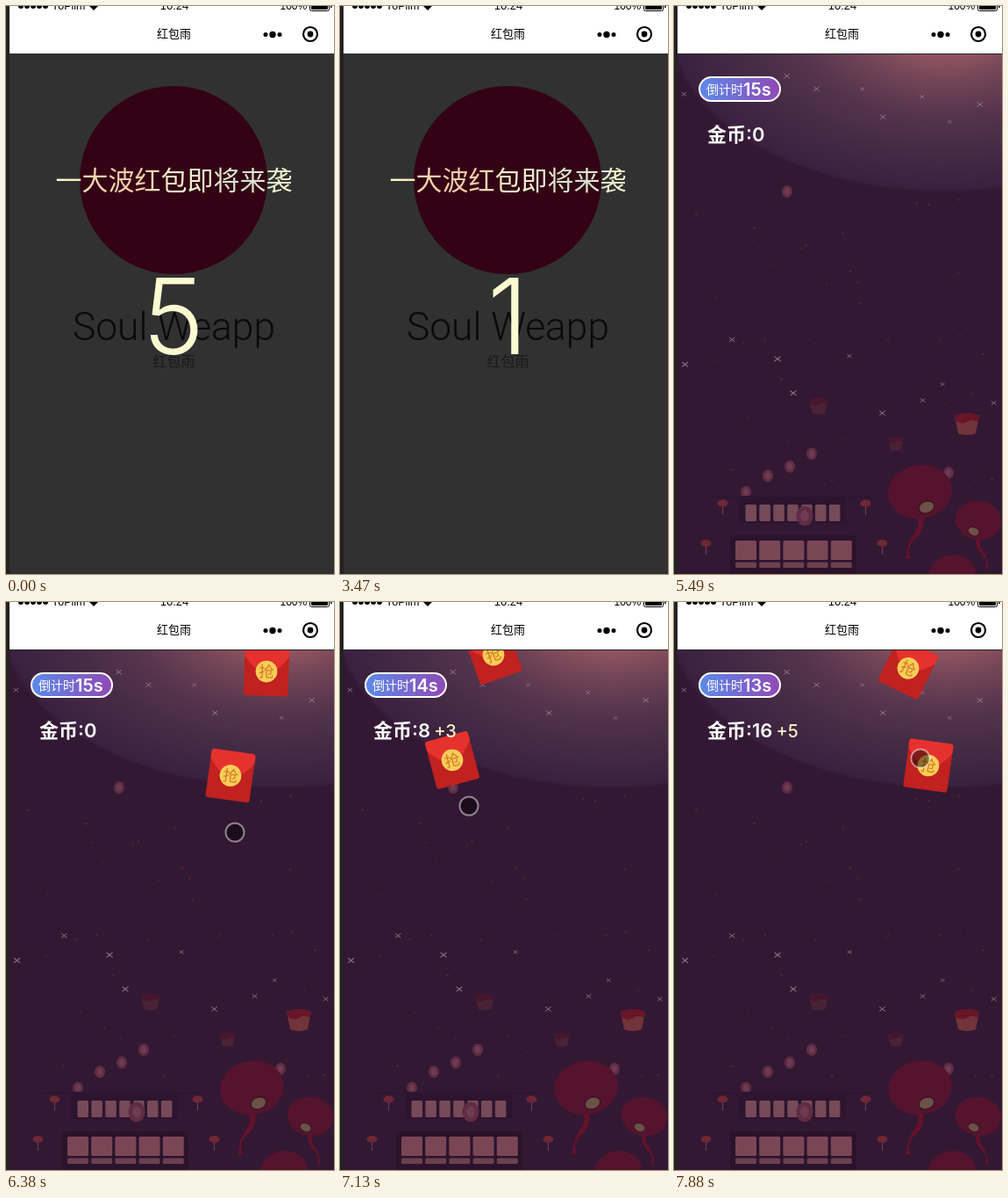
Animation, 374 px wide and 646 px high, one loop 8 s. Source, as an HTML page:

```html
<!DOCTYPE html>
<html lang="zh-CN">
<head>
<meta charset="utf-8">
<title>红包雨</title>
<style>
html, body { margin: 0; width: 100%; height: 100%; overflow: hidden; background: #222; }
svg { display: block; width: 374px; height: 646px; }
text { font-family: Inter, "Noto Sans CJK SC", "Noto Sans CJK", sans-serif; }
.thin { font-family: Roboto, "Open Sans", sans-serif; font-weight: 300; }
.cjk { font-family: "Noto Sans CJK SC", "Noto Sans CJK", sans-serif; }
.mid { text-anchor: middle; }
.bar { font-family: "Liberation Sans", sans-serif; }
</style>
</head>
<body>
<svg viewBox="0 0 374 646" xmlns="http://www.w3.org/2000/svg">
  <defs>
    <clipPath id="page"><rect x="4" y="55" width="370" height="591"/></clipPath>
    <radialGradient id="glow" gradientUnits="userSpaceOnUse" cx="0" cy="0" r="192"
      gradientTransform="translate(310 20) scale(1.65 1)">
      <stop offset="0" stop-color="#a2616b"/>
      <stop offset=".2" stop-color="#8f5360"/>
      <stop offset=".34" stop-color="#734557"/>
      <stop offset=".55" stop-color="#55344d"/>
      <stop offset=".78" stop-color="#442a44"/>
      <stop offset=".98" stop-color="#3a2140"/>
      <stop offset="1" stop-color="#331833"/>
    </radialGradient>
    <linearGradient id="badge">
      <stop offset="0" stop-color="#5b8aec"/>
      <stop offset="1" stop-color="#9149b4"/>
    </linearGradient>
    <linearGradient id="cream" gradientUnits="userSpaceOnUse" x1="57" x2="327" y1="0" y2="0">
      <stop offset="0" stop-color="#fdf8cf"/>
      <stop offset=".2" stop-color="#f6ccab"/>
      <stop offset=".36" stop-color="#f6ccab"/>
      <stop offset=".5" stop-color="#f8f4ce"/>
      <stop offset=".8" stop-color="#cfe0d2"/>
      <stop offset="1" stop-color="#fdf8cf"/>
    </linearGradient>
    <path id="spark" d="M-3-2.4 3 2.4M3-2.4-3 2.4" stroke="#937e90" stroke-width=".9"/>
    <g id="pendant">
      <path d="M0 0v13" stroke="#66404d" stroke-width="1.2"/>
      <ellipse rx="6" ry="4" fill="#6f2735"/>
    </g>
    <g id="pail">
      <path d="M-14-8Q0-14 14-8L10 12Q0 16-10 12Z" fill="#70343a"/>
      <path d="M-14-8Q0-14 14-8L12.5-1Q6-5 0-1T-12.5-2Z" fill="#681528"/>
    </g>
    <g id="bokeh">
      <ellipse rx="6" ry="7" fill="#602c44"/>
      <ellipse rx="3" ry="4" fill="#fff" opacity=".08"/>
    </g>
    <g id="lantern">
      <path d="M3 26Q7 42-5 53T-10 75L-16 76Q-14 56-7 48T-3 28Z" fill="#63122a"/>
      <ellipse rx="36.5" ry="30.5" fill="#56132e" transform="rotate(-10)"/>
      <g transform="translate(7.5 17.5) rotate(-20)">
        <ellipse rx="10" ry="7.5" fill="#3b1420"/>
        <ellipse rx="8.5" ry="6" fill="#6b5147"/>
      </g>
    </g>
    <g id="packet">
      <rect x="-24.5" y="-27" width="49" height="54" rx="3" fill="#c1211f"/>
      <path d="M-24.5-17V-24Q-24.5-27-21.5-27H21.5Q24.5-27 24.5-24V-17Q0 20-24.5-17Z" fill="#e6322e"/>
      <circle r="12" fill="#f8cd58"/>
      <text class="cjk mid" y="6.4" font-size="17" fill="#d27a22">抢</text>
    </g>
  </defs>

  <rect width="374" height="646" fill="#222"/>

  <g id="intro">
    <rect x="4" y="54" width="370" height="592" fill="#313131"/>
    <circle cx="191" cy="198" r="107" fill="#330214"/>
    <text class="thin mid" x="191.5" y="380" font-size="44.3" fill="#0a0a0a">Soul Weapp</text>
    <text class="cjk mid" x="191.5" y="410" font-size="16" font-weight="300" fill="#1b1b1b">红包雨</text>
    <text class="cjk mid" x="191.5" y="209" font-size="30" font-weight="300" fill="url(#cream)">一大波红包即将来袭</text>
    <text class="mid" id="count" x="191.5" y="395.5" font-size="119" font-weight="300" fill="#fdfad2"></text>
  </g>

  <g id="game" clip-path="url(#page)">
    <rect x="4" y="55" width="370" height="591" fill="#331833"/>
    <rect x="4" y="55" width="370" height="591" fill="url(#glow)"/>
    <g id="scene"></g>
    <g id="packets"></g>
    <rect x="29" y="81" width="92" height="27" rx="13.5" fill="url(#badge)" stroke="#fff" stroke-width="2"/>
    <text class="cjk" x="37" y="100.4" font-size="14" fill="#fff">倒计时</text>
    <text id="clock" x="79" y="102" font-size="20" font-weight="600" fill="#fff"></text>
    <text x="38" y="153.5" font-size="22" font-weight="600" fill="#fff"><tspan class="cjk">金币</tspan><tspan id="score"></tspan><tspan id="bonus" dx="4" font-size="20" font-weight="500" fill="#f6f2c4"></tspan></text>
    <circle id="touch" r="10.5" fill="#000" fill-opacity=".45" stroke="#fff" stroke-opacity=".48" stroke-width="2"/>
  </g>

  <g id="header">
    <rect x="4" width="370" height="54" fill="#fff"/>
    <path d="M17 0h28.1" stroke="#000" stroke-width="6" stroke-linecap="round" stroke-dasharray="0 7"/>
    <text class="bar" x="52" y="4" font-size="12.5">YoPlim</text>
    <path d="M95 0Q100-4 105 0L100 5Z"/>
    <text class="bar mid" x="192" y="4" font-size="13">10:24</text>
    <text class="bar" x="312.5" y="4" font-size="12">100%</text>
    <rect x="346.5" y="-5.5" width="22" height="11" rx="2" fill="none" stroke="#000"/>
    <rect x="348" y="-4" width="19" height="8" rx="1"/>
    <rect x="370" y="-2" width="1.5" height="4"/>
    <text class="cjk mid" x="191.5" y="36" font-size="13">红包雨</text>
    <circle cx="296" cy="32.5" r="2.5"/>
    <circle cx="304" cy="32.5" r="3.7"/>
    <circle cx="312" cy="32.5" r="2.5"/>
    <circle cx="347" cy="32" r="3.4"/>
    <circle cx="347" cy="32" r="8" fill="none" stroke="#000" stroke-width="2.2"/>
  </g>
</svg>
<script>
const LOOP = 8000, GAME = 5490;
const TICK = 150, FIRST_TICK = 5480;
const FALL = .31; // px per ms

const $ = id => document.getElementById(id);

const packets = [
  { x: 256, born: 5743, turn: 8, caught: 6680, gain: 5 },
  { x: 297, born: 6125, turn: 2, caught: 7130, gain: 3 },
  { x: 128, born: 6550, turn: -15, caught: 7430, gain: 3 },
  { x: 175, born: 6936, turn: -20, caught: 7730, gain: 5 },
  { x: 290, born: 7280, turn: 8 },
  { x: 267, born: 7637, turn: 26 }
];

// Key points of the finger: it glides straight from one to the next
const finger = [
  { t: 5780, x: 203, y: 415 },
  { t: 5930, x: 159, y: 290 },
  { t: 6080, x: 149, y: 290 },
  { t: 6380, x: 261, y: 262 },
  { t: 6980, x: 296, y: 242 },
  { t: 7130, x: 147, y: 232 },
  { t: 7580, x: 176, y: 206 },
  { t: 7880, x: 281, y: 178 }
];

function fingerAt(t) {
  const i = finger.findLastIndex(p => p.t <= t);
  if (i < 0) return null;
  const a = finger[i], b = finger[i + 1] || a;
  const k = a === b ? 0 : (t - a.t) / (b.t - a.t);
  return [a.x + (b.x - a.x) * k, a.y + (b.y - a.y) * k];
}

let seed = 11;
const rnd = (lo, hi) => {
  seed = seed * 16807 % 2147483647;
  return lo + (hi - lo) * seed / 2147483647;
};

const repeat = (n, make) => Array.from({ length: n }, (_, i) => make(i)).join('');
const use = (id, x, y, more = '') => `<use href="#${id}" transform="translate(${x} ${y}) ${more}"/>`;
const box = (x, y, w, h, fill, rx = 1.5) =>
  `<rect x="${x}" y="${y}" width="${w}" height="${h}" rx="${rx}" fill="${fill}"/>`;

// Evenly spread across the page, with random offsets
const sparks = (n, top, bottom) => repeat(n, i =>
  use('spark', 4 + 370 * (i + rnd(.2, .8)) / n, rnd(top, bottom), `scale(${rnd(.75, 1.2)})`));

const gate = () =>
  box(40, 557, 188, 3, '#2e1630') + box(74, 560, 122, 28, '#2d142f', 3) + box(64, 602, 144, 44, '#2b132c', 3) +
  repeat(7, i => box(81.5 + i * 15.9, 567, 12.5, 19, '#764a58')) +
  repeat(5, i => box(70 + i * 27.2, 608, 24, 22, '#7a4655') + box(70 + i * 27.2, 632.5, 24, 6.5, '#6c404f')) +
  use('bokeh', 149, 580, 'scale(1.6)') +
  repeat(4, i => {
    const row = i >> 1, side = i % 2 ? 1 : -1;
    return use('pendant', 137 + side * (81.5 + 19 * row), 565.5 + 45.5 * row);
  });

$('scene').innerHTML =
  sparks(10, 60, 150) + sparks(9, 370, 468) +
  repeat(44, () => `<circle cx="${rnd(8, 370)}" cy="${rnd(220, 540)}" r="${rnd(.7, 1.4)}" fill="#5b2041"/>`) +
  use('bokeh', 129, 211) + use('bokeh', 313, 531) +
  repeat(4, i => use('bokeh', 82 + 25 * i, 553 - 15 * i + rnd(-6, 6))) +
  gate() +
  use('pail', 334, 474) +
  `<g opacity=".38">${use('pail', 165, 454, 'scale(.75)')}${use('pail', 253, 497, 'scale(.62)')}</g>` +
  use('lantern', 280.5, 552.5) + use('lantern', 347, 585, 'scale(-.72 .72)') + use('lantern', 317, 647, 'scale(.74)');

function drawGame(t) {
  const caught = packets.filter(p => p.caught <= t);
  const falling = packets.filter(p => p.born <= t && !caught.includes(p));
  const touch = fingerAt(t);

  $('touch').style.display = touch ? '' : 'none';
  if (touch) $('touch').setAttribute('transform', `translate(${touch})`);
  $('clock').textContent = 15 - Math.floor((t - GAME + 60) / 1000) + 's';
  $('score').textContent = ':' + caught.reduce((sum, p) => sum + p.gain, 0);
  $('bonus').textContent = caught.length ? '+' + caught.at(-1).gain : '';
  $('packets').innerHTML = falling
    .map(p => use('packet', p.x, (t - p.born) * FALL, `rotate(${p.turn}) scale(1.03)`)).join('');
}

const start = performance.now();
function frame() {
  const t = (performance.now() - start) % LOOP;
  const playing = t >= GAME;
  $('intro').style.display = playing ? 'none' : '';
  $('game').style.display = playing ? '' : 'none';
  if (playing) drawGame(t - (t - FIRST_TICK) % TICK);
  else $('count').textContent = Math.max(0, 5 - Math.floor((t + 550) / 1000));
  requestAnimationFrame(frame);
}
frame();
</script>
</body>
</html>
```
